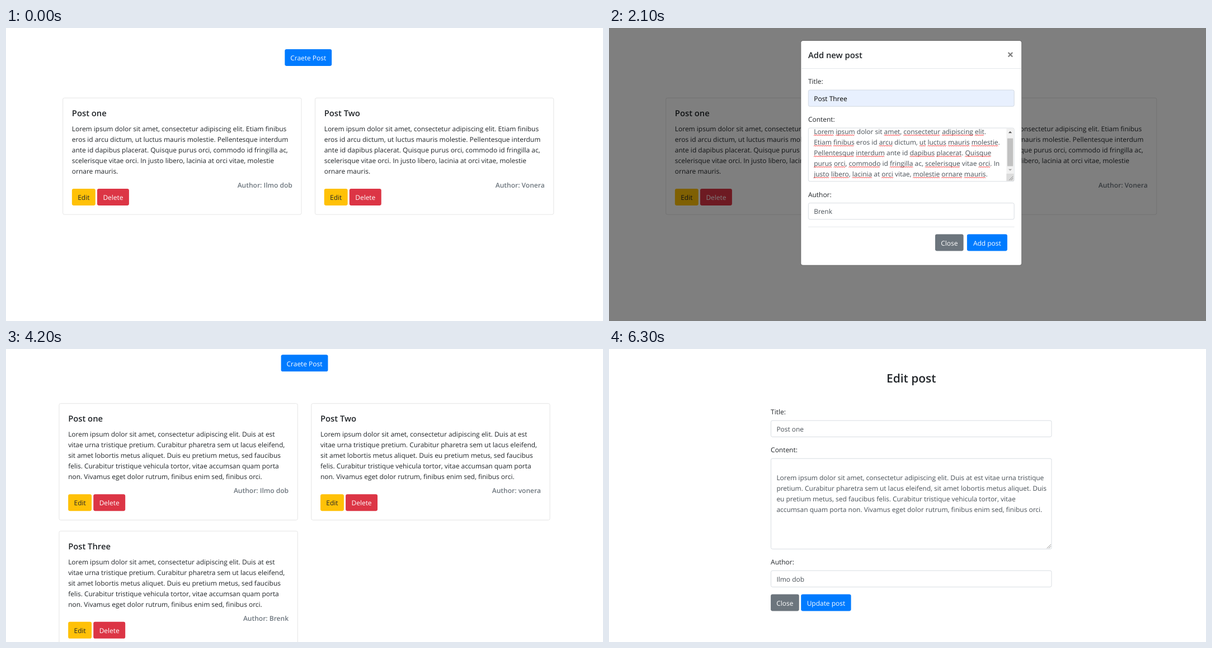
Recreate the animation shown at these times as an HTML page with a canvas. Size 1067 by 525 pixels, loop 8.4 s.

```html
<!DOCTYPE html>
<html lang="en">
<head>
<meta charset="utf-8">
<title>Posts</title>
<style>
  html, body { margin: 0; width: 100%; height: 100%; overflow: hidden; background: #fff; }
  canvas { display: block; }
</style>
</head>
<body>
<canvas id="stage" width="1067" height="525"></canvas>
<script>
const ctx = document.getElementById('stage').getContext('2d');
const SCALE = 1067 / 1349;   // page pixels to stage pixels
const SCENE_MS = 2100;
const LINE = 24;
const BASE = 18.6;           // baseline offset inside a text line
const FAMILY = '"Open Sans", "Noto Sans", sans-serif';
const FONT = {
  body: `400 15.12px ${FAMILY}`,
  author: `600 15.2px ${FAMILY}`,
  title: `600 18.7px ${FAMILY}`,
  heading: `600 26.4px ${FAMILY}`,
  cross: `700 26px ${FAMILY}`
};
const INK = '#212529', FIELD_INK = '#495057', GREY = '#6c757d', FIELD_EDGE = '#ced4da';
const BLUE = '#007bff', YELLOW = '#ffc107', RED = '#dc3545';

const DRAFT = [
  'Lorem ipsum dolor sit amet, consectetur adipiscing elit. Etiam finibus',
  'eros id arcu dictum, ut luctus mauris molestie. Pellentesque interdum',
  'ante id dapibus placerat. Quisque purus orci, commodo id fringilla ac,',
  'scelerisque vitae orci. In justo libero, lacinia at orci vitae, molestie',
  'ornare mauris.'
];
const DRAFT_NARROW = [
  'Lorem ipsum dolor sit amet, consectetur adipiscing elit.',
  'Etiam finibus eros id arcu dictum, ut luctus mauris molestie.',
  'Pellentesque interdum ante id dapibus placerat. Quisque',
  'purus orci, commodo id fringilla ac, scelerisque vitae orci. In',
  'justo libero, lacinia at orci vitae, molestie ornare mauris.'
];
const SAVED = [
  'Lorem ipsum dolor sit amet, consectetur adipiscing elit. Duis at est',
  'vitae urna tristique pretium. Curabitur pharetra sem ut lacus eleifend,',
  'sit amet lobortis metus aliquet. Duis eu pretium metus, sed faucibus',
  'felis. Curabitur tristique vehicula tortor, vitae accumsan quam porta',
  'non. Vivamus eget dolor rutrum, finibus enim sed, finibus orci.'
];
const SAVED_WIDE = [
  'Lorem ipsum dolor sit amet, consectetur adipiscing elit. Duis at est vitae urna tristique',
  'pretium. Curabitur pharetra sem ut lacus eleifend, sit amet lobortis metus aliquet. Duis',
  'eu pretium metus, sed faucibus felis. Curabitur tristique vehicula tortor, vitae',
  'accumsan quam porta non. Vivamus eget dolor rutrum, finibus enim sed, finibus orci.'
];
const KNOWN_WORDS = new Set('dolor sit eros id dictum ante ac vitae In at'.split(' '));

function text(str, x, y, font = FONT.body, color = INK, align = 'left') {
  ctx.font = font;
  ctx.fillStyle = color;
  ctx.textAlign = align;
  ctx.fillText(str, x, y);
}

function lines(list, x, y, color) {
  list.forEach((str, i) => text(str, x, y + i * LINE, FONT.body, color));
}

function rect(x, y, w, h, color) {
  ctx.fillStyle = color;
  ctx.fillRect(x, y, w, h);
}

function box(x, y, w, h, fill, edge, radius = 4) {
  ctx.beginPath();
  ctx.roundRect(x, y, w, h, radius);
  ctx.fillStyle = fill;
  ctx.fill();
  if (!edge) return;
  ctx.beginPath();
  ctx.roundRect(x + 0.5, y + 0.5, w - 1, h - 1, radius - 0.5);
  ctx.strokeStyle = edge;
  ctx.lineWidth = 1;
  ctx.stroke();
}

function button(label, x, y, w, fill, color = '#fff') {
  box(x, y, w, 38, fill);
  text(label, x + w / 2, y + 7 + BASE, FONT.body, color, 'center');
}

function field(label, value, x, y, w, fill = '#fff', color = FIELD_INK) {
  text(label, x, y + BASE);
  box(x, y + 32, w, 38, fill, FIELD_EDGE);
  text(value, x + 13, y + 39 + BASE, FONT.body, color);
}

function grip(right, bottom) {
  ctx.strokeStyle = '#777';
  ctx.lineWidth = 1;
  ctx.beginPath();
  for (const size of [9, 5]) {
    ctx.moveTo(right - size - 2, bottom - 2);
    ctx.lineTo(right - 2, bottom - size - 2);
  }
  ctx.stroke();
}

function card(x, y, title, content, author) {
  const left = x + 21;
  box(x, y, 540, 265, '#fff', '#dfdfdf');
  text(title, left, y + 41.3, FONT.title);
  lines(content, left, y + 57 + BASE);
  text('Author: ' + author, x + 519, y + 185 + BASE, FONT.author, GREY, 'right');
  button('Edit', left, y + 206, 53, YELLOW, INK);
  button('Delete', left + 57, y + 206, 72, RED);
}

function squiggle(x, y, w) {
  ctx.beginPath();
  for (let dx = 0; dx <= w; dx += 2) ctx.lineTo(x + dx, y + (dx % 4 ? -1 : 1));
  ctx.strokeStyle = '#f00';
  ctx.lineWidth = 1.1;
  ctx.stroke();
}

function markSpelling(str, x, y) {
  ctx.font = FONT.body;
  for (const match of str.matchAll(/[A-Za-z]+/g)) {
    if (KNOWN_WORDS.has(match[0])) continue;
    const start = ctx.measureText(str.slice(0, match.index)).width;
    squiggle(x + start, y + 2.8, ctx.measureText(match[0]).width);
  }
}

function arrow(x, y, dir, color) {
  ctx.beginPath();
  ctx.moveTo(x - 4, y + 2 * dir);
  ctx.lineTo(x + 4, y + 2 * dir);
  ctx.lineTo(x, y - 2 * dir);
  ctx.fillStyle = color;
  ctx.fill();
}

function scrollbar(x, y) {
  rect(x, y, 17, 103, '#f1f1f1');
  rect(x + 2, y + 23, 13, 63, '#c1c1c1');
  arrow(x + 8.5, y + 9, 1, '#505050');
  arrow(x + 8.5, y + 94.5, -1, '#a3a3a3');
  rect(x, y + 103, 17, 17, '#dcdcdc');
  grip(x + 17, y + 120);
}

function postList(shift, scroll, posts, content) {
  button('Craete Post', 630 + shift, 48 - scroll, 106, BLUE);
  posts.forEach(([title, author], i) => {
    const x = 128 + shift + (i % 2) * 570;
    const y = 158 - scroll + Math.floor(i / 2) * 289;
    card(x, y, title, content, author);
  });
}

function firstList() {
  postList(0, 0, [['Post one', 'Ilmo dob'], ['Post Two', 'Vonera']], DRAFT);
}

function newPostDialog() {
  firstList();
  rect(0, 0, 1349, 664, 'rgba(0,0,0,.5)');
  box(433, 28, 500, 510, 'rgba(0,0,0,.2)', null, 5);
  box(434, 29, 498, 508, '#fff', null, 4.5);
  text('Add new post', 450, 68.3, FONT.title);
  text('×', 907, 69.4, FONT.cross, '#7f7f7f', 'center');
  rect(434, 91, 498, 1, '#dee2e6');

  field('Title:', 'Post Three', 450, 108, 466, '#e8f0fe', '#000');
  text('Content:', 450, 194 + BASE);
  box(450, 226, 466, 122, '#fff', FIELD_EDGE);
  ctx.save();
  ctx.beginPath();
  ctx.rect(451, 227, 464, 120);
  ctx.clip();
  lines(DRAFT_NARROW, 463, 240, FIELD_INK);
  DRAFT_NARROW.forEach((str, i) => markSpelling(str, 463, 240 + i * LINE));
  scrollbar(898, 227);
  ctx.restore();
  field('Author:', 'Brenk', 450, 364, 466);

  rect(450, 450, 466, 1, '#dee2e6');
  button('Close', 737, 467, 64, GREY);
  button('Add post', 809, 467, 91, BLUE);
}

function savedList() {
  const posts = [['Post one', 'Ilmo dob'], ['Post Two', 'vonera'], ['Post Three', 'Brenk']];
  postList(-8.5, 35, posts, SAVED);
}

function editForm() {
  const x = 365.5, w = 635;
  text('Edit post', 683, 76.4, FONT.heading, INK, 'center');
  field('Title:', 'Post one', x, 129.6, w);
  text('Content:', x, 215.6 + BASE);
  box(x, 247.6, w, 206, '#fff', FIELD_EDGE);
  lines(SAVED_WIDE, x + 13, 278.6 + BASE, FIELD_INK);
  grip(x + w, 453.6);
  field('Author:', 'Ilmo dob', x, 469.6, w);
  button('Close', x, 555.6, 64, GREY);
  button('Update post', x + 68.4, 555.6, 113, BLUE);
}

const scenes = [firstList, newPostDialog, savedList, editForm];
const start = performance.now();

function draw() {
  const elapsed = performance.now() - start;
  const scene = scenes[Math.floor(elapsed / SCENE_MS) % scenes.length];
  ctx.setTransform(SCALE, 0, 0, SCALE, 0, 0);
  ctx.textRendering = 'geometricPrecision';
  rect(0, 0, 1349, 664, '#fff');
  scene();
  requestAnimationFrame(draw);
}
draw();
</script>
</body>
</html>
```
